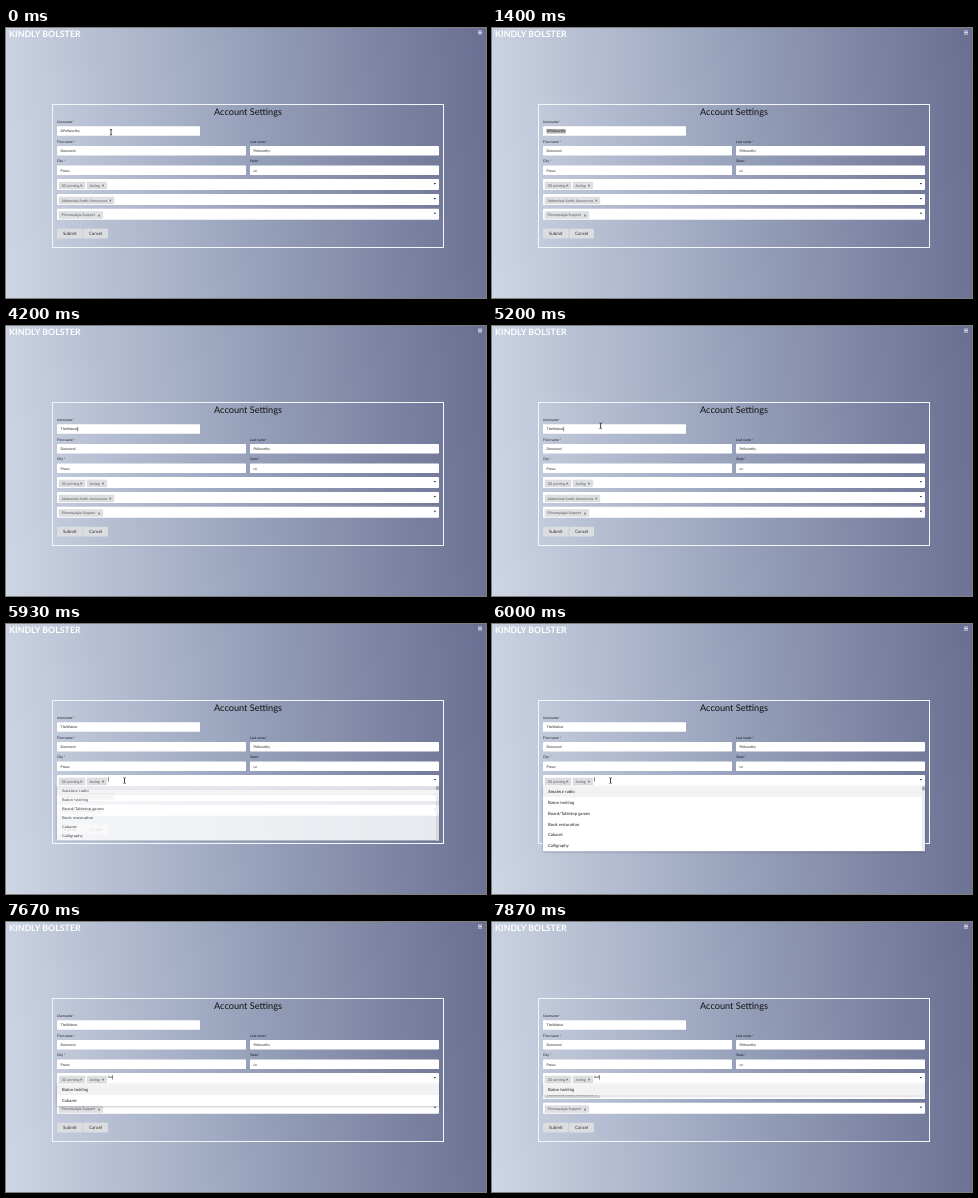
These frames come from a looping animation (480x270 px, 8000 ms). An HTML page:

```html
<!DOCTYPE html>
<html lang="en">
<head>
<meta charset="utf-8">
<title>Account Settings</title>
<style>
  html, body { margin: 0; width: 100%; height: 100%; overflow: hidden; }
  body { background: linear-gradient(86deg, #ced6e4, #9aa4bd 48%, #6a6f91); }
  svg { display: block; width: 100%; height: 100%; }
  text { font-family: Lato, "Open Sans", sans-serif; text-rendering: geometricPrecision; white-space: pre; }
</style>
</head>
<body>
<svg viewBox="0 0 480 270">
  <defs>
    <filter id="shadow" x="-5%" y="-20%" width="110%" height="160%">
      <feDropShadow dx="0" dy="0.8" stdDeviation="0.8" flood-color="#223" flood-opacity="0.3"/>
    </filter>
  </defs>
  <g id="page"></g>
  <g id="live"></g>
</svg>
<script>
const LOOP = 8000;
const INPUT_SIZE = 3.5;
const OLD_USER = 'DPellworthy';
const NEW_USER = 'TheWalnut';
const USER_KEYS = [1470, 1730, 1870, 2400, 2730, 3130, 3330, 3530, 4200];
const SEARCH = 'bat';
const SEARCH_KEYS = [7470, 7670, 7870];
const OPEN_AT = 5830;

const ALL_HOBBIES = ['Amateur radio', 'Baton twirling', 'Board/Tabletop games',
  'Book restoration', 'Cabaret', 'Calligraphy'];
const B_HOBBIES = ['Baton twirling', 'Board/Tabletop games', 'Book restoration',
  'Cabaret', 'Embroidery', 'Gaming (tabletop games and role-playing games)'];

const pen = document.createElement('canvas').getContext('2d');
pen.font = '100px Lato, "Open Sans", sans-serif';
const textWidth = (s, size) => pen.measureText(s).width * size / 100;

const rect = (x, y, w, h, fill, extra = '') =>
  `<rect x="${x}" y="${y}" width="${w}" height="${h}" fill="${fill}" ${extra}/>`;
const text = (s, x, y, size, fill = '#222', extra = '') =>
  `<text x="${x}" y="${y}" font-size="${size}" fill="${fill}" ${extra}>${s}</text>`;

const clamp = v => Math.max(0, Math.min(1, v));
const ease = v => { v = clamp(v); return v * v * (3 - 2 * v); };
const typed = (word, keys, t) => word.slice(0, keys.filter(k => t >= k).length);
const blinkOn = (t, since) => Math.floor((t - since) / 500) % 2 === 0;

function field(label, x, y, w, value = '') {
  return text(label, x, y - 3.3, 3.45, '#15171f')
    + text('*', x + textWidth(label, 3.45) + 0.6, y - 3.3, 3.2, '#15171f')
    + rect(x, y, w, 9.5, '#fff', 'rx="0.9"')
    + text(value, x + 3.6, y + 6, INPUT_SIZE);
}

function tag(label, x, y, w) {
  return rect(x, y, w, 7, '#dedfe2', 'rx="0.7" stroke="#c6c7cb" stroke-width="0.3"')
    + text(label, x + 2.5, y + 4.8, 3.6, '#555')
    + text('×', x + w - 5, y + 4.9, 4.4, '#444', 'font-weight="700"');
}

function picker(y, tags) {
  return rect(51, y, 382, 11, '#fff', 'rx="0.9"')
    + `<path d="M427.6 ${y + 4}h2.6l-1.3 1.6z" fill="#333"/>`
    + tags.map(([label, x, w]) => tag(label, x, y + 2.9, w)).join('');
}

function button(label, x, w) {
  return rect(x, 200.7, w, 9.7, '#dcdde1', 'rx="0.8"')
    + text(label, x + w / 2, 207.1, 4.5, '#333', 'text-anchor="middle"');
}

function mouse(x, y) {
  return `<path d="M${x - 1.1} ${y - 2.8}q1.1 0 1.1 0.7q0-0.7 1.1-0.7M${x} ${y - 2.2}v4.4
    M${x - 1.1} ${y + 2.8}q1.1 0 1.1-0.7q0 0.7 1.1 0.7" fill="none" stroke="#111" stroke-width="0.75"/>`;
}

const caret = (x, y) => rect(x + 0.2, y, 0.5, 4.4, '#111');

function dropdown(items, thumb) {
  const pitch = 10.8;
  const height = items.length * pitch + 0.3;
  let out = rect(51, 162, 382, height, '#fff', 'filter="url(#shadow)"')
    + rect(51, 162.3, 382, pitch, '#f2f2f3');
  items.forEach((item, i) => out += text(item, 56, 169.2 + i * pitch, 4.25));
  if (thumb) out += rect(429.8, 162.2, 3.2, height - 0.2, '#ececee')
    + rect(430, 162.6, 2.8, thumb, '#a4a5aa', 'rx="0.8"');
  return out;
}

function username(t) {
  const editing = t >= 1470;
  const value = editing ? typed(NEW_USER, USER_KEYS, t) : OLD_USER;
  const width = textWidth(value, INPUT_SIZE);
  let out = '';
  if (!editing && t >= 200) out += rect(54.6, 100.9, width, 4.7, '#b3b4b3');
  out += text(value, 54.6, 104.3, INPUT_SIZE);
  if (editing && t < 5870) {
    const lastKey = USER_KEYS.filter(k => t >= k).pop();
    if (blinkOn(t, lastKey)) out += caret(54.6 + width, 100.9);
  }
  return out;
}

function hobbies(t) {
  if (t < OPEN_AT) return '';
  const value = typed(SEARCH, SEARCH_KEYS, t);
  const lastKey = SEARCH_KEYS.filter(k => t >= k).pop() ?? 6030;
  let list;
  if (t >= 7870) list = dropdown(['Baton twirling']);
  else if (t >= 7670) list = dropdown(['Baton twirling', 'Cabaret']);
  else if (t >= 7530) list = dropdown(B_HOBBIES, 24);
  else list = dropdown(ALL_HOBBIES, 4);

  const p = clamp((t - OPEN_AT) / 170);
  const grow = 1 - (1 - p) ** 2;
  let out = `<g opacity="${grow}" transform="translate(0 162) scale(1 ${grow}) translate(0 -162)">${list}</g>`
    + text(value, 102.3, 156.4, INPUT_SIZE);
  if (t < 6030 || blinkOn(t, lastKey)) out += caret(102.1 + textWidth(value, INPUT_SIZE), 153.1);
  return out;
}

function pointer(t) {
  if (t < 1400) return mouse(105, 104.2);
  if (t < 4930 || t >= 7470) return '';
  const rise = ease((t - 4930) / 300);
  const drop = ease((t - 5240) / 490);
  return mouse(105 + 3.7 * rise + 9.8 * drop, 104.2 - 4.5 * rise + 56.8 * drop);
}

document.getElementById('page').innerHTML =
  text('KINDLY BOLSTER', 3, 8.8, 8.8, '#fff', 'font-weight="700"')
  + [3, 4.5, 6].map(y => rect(472, y - 0.3, 4, 0.7, '#fff')).join('')
  + rect(46.5, 76.5, 391, 143, 'none', 'stroke="#f4f5f9" stroke-width="1"')
  + text('Account Settings', 242, 86.7, 9.2, '#111', 'text-anchor="middle"')
  + field('Username', 51, 98.3, 143)
  + field('First name', 51, 118, 189, 'Desmond')
  + field('Last name', 244, 118, 189, 'Pellworthy')
  + field('City', 51, 137.6, 189, 'Provo')
  + field('State', 244, 137.6, 189, 'ut')
  + picker(151, [['3D printing', 53, 26], ['Acting', 81, 19.8]])
  + picker(166, [['Abdominal Aortic Aneurysms', 53, 55]])
  + picker(180.7, [['Fibromyalgia Support', 53, 43.8]])
  + button('Submit', 51, 25.6)
  + button('Cancel', 77.2, 24.8);

const live = document.getElementById('live');
function frame(now) {
  const t = now % LOOP;
  live.innerHTML = username(t) + hobbies(t) + pointer(t);
  requestAnimationFrame(frame);
}
frame(performance.now());
</script>
</body>
</html>
```
